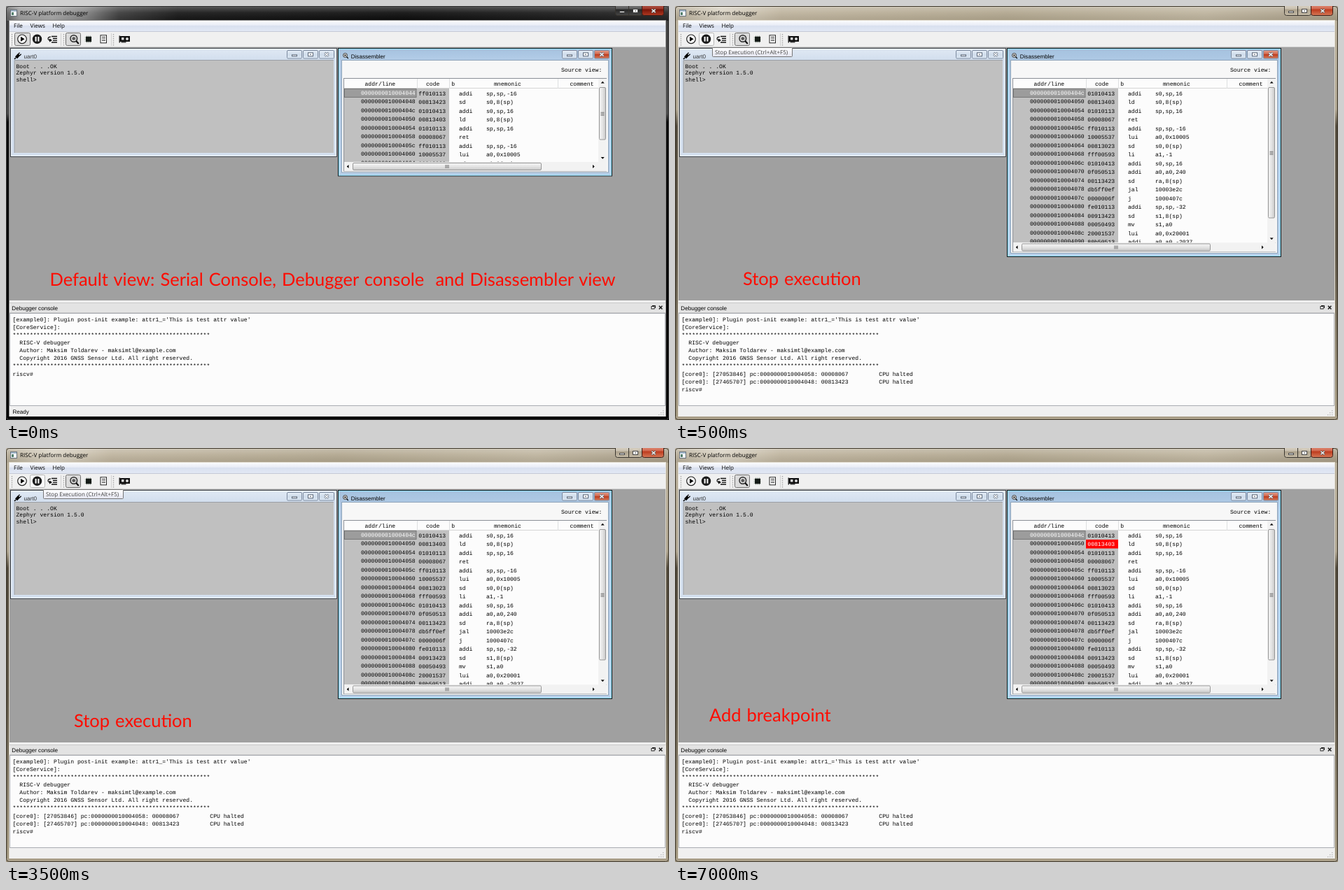
These frames come from a looping animation (947 by 592 pixels, 8 s). An HTML page:

```html
<!DOCTYPE html>
<html lang="en">
<head>
<meta charset="utf-8">
<title>Debugger walkthrough</title>
<style>
  html, body { margin: 0; width: 100%; height: 100%; overflow: hidden; background: #000; }
  svg { display: block; width: 947px; height: 592px; }
  text { white-space: pre; text-rendering: geometricPrecision; }
  .mono { font: 8.1px "Liberation Mono", monospace; }
  .ui { font: 8.1px "Open Sans", sans-serif; }
  .label { font: 8.1px "Liberation Sans", sans-serif; }
  .caption { font: 25.5px Lato, sans-serif; word-spacing: 1.5px; fill: #ff0c00; }
</style>
</head>
<body>
<svg id="stage" viewBox="0 0 947 592"></svg>
<script>
const LOOP = 8000;
const STARTS = [0, 500, 5500];

const rect = (x, y, w, h, fill, extra = '') =>
  `<rect x="${x}" y="${y}" width="${w}" height="${h}" fill="${fill}" ${extra}/>`;
const box = (x, y, w, h, fill, stroke, r = 0) =>
  rect(x, y, w, h, fill, `stroke="${stroke}" stroke-width="1" rx="${r}"`);
const line = (d, stroke = '#000', width = 1) =>
  `<path d="${d}" fill="none" stroke="${stroke}" stroke-width="${width}"/>`;
const shape = (d, fill = '#000') => `<path d="${d}" fill="${fill}"/>`;
const circle = (x, y, r, fill, stroke = 'none', width = 1) =>
  `<circle cx="${x}" cy="${y}" r="${r}" fill="${fill}" stroke="${stroke}" stroke-width="${width}"/>`;
const text = (cls, x, y, s, fill = '#000') =>
  `<text class="${cls}" x="${x}" y="${y}" fill="${fill}">${s}</text>`;
const mono = (x, y, s, fill) => text('mono', x, y, s, fill);
const lines = (x, y, pitch, list) => list.map((s, i) => mono(x, y + i * pitch, s)).join('');
const during = (states, body) => `<g data-states="${states}">${body}</g>`;
const gradient = (id, horizontal, stops) =>
  `<linearGradient id="${id}" x2="${+horizontal}" y2="${+!horizontal}">` +
  stops.map(([at, color]) => `<stop offset="${at}" stop-color="${color}"/>`).join('') +
  '</linearGradient>';

const defs = '<defs>' + [
  gradient('darkTitle', true, [[0, '#5c5c5c'], [.02, '#9a9a9a'], [.07, '#a4a4a4'], [.12, '#818181'], [.17, '#3a3a3a'], [.26, '#161616'], [.6, '#0c0c0c'], [1, '#242424']]),
  gradient('tanTitle', true, [[0, '#b5ab96'], [.07, '#d8d1c2'], [.16, '#bdb29c'], [.5, '#b0a58d'], [.8, '#bdb39d'], [1, '#a69b85']]),
  gradient('darkSide', false, [[0, '#3c3c3c'], [.26, '#4a4a4a'], [.28, '#0a0a0a'], [1, '#000']]),
  gradient('tanSide', false, [[0, '#b9af9a'], [.25, '#aaa08b'], [.29, '#51493b'], [.6, '#5b5344'], [1, '#a3987f']]),
  gradient('shine', false, [[0, 'rgba(255,255,255,.3)'], [.45, 'rgba(255,255,255,.08)'], [1, 'rgba(0,0,0,.06)']]),
  gradient('menu', false, [[0, '#fbfcfe'], [.45, '#e7ebf5'], [.5, '#d9e0ef'], [1, '#e2e8f4']]),
  gradient('idle', false, [[0, '#e0e9f4'], [.1, '#d3dfee'], [1, '#d5e1f0']]),
  gradient('active', false, [[0, '#a5c2df'], [.1, '#b4cde8'], [1, '#b9d2ec']]),
  gradient('button', false, [[0, '#e6eef7'], [.5, '#cfdceb'], [1, '#dce7f3']]),
  gradient('close', false, [[0, '#e5a18f'], [.45, '#d0654b'], [.5, '#bd3a1d'], [1, '#d67a58']]),
  gradient('darkClose', false, [[0, '#b5685c'], [.45, '#9e3527'], [.5, '#761408'], [1, '#b03a22']]),
  gradient('darkButton', false, [[0, '#8b8b8b'], [.45, '#5a5a5a'], [.5, '#272727'], [1, '#464646']]),
  gradient('tanButton', false, [[0, '#ded8cc'], [.45, '#c9c0af'], [.5, '#aca18c'], [1, '#c6bca8']]),
  gradient('thumbV', true, [[0, '#f6f6f6'], [.5, '#e4e4e4'], [1, '#c8c8c8']]),
  gradient('thumbH', false, [[0, '#f6f6f6'], [.5, '#e4e4e4'], [1, '#c8c8c8']]),
  gradient('tip', false, [[0, '#fff'], [1, '#e4e5f0']]),
].join('') + '</defs>';

// Glyphs for minimise, maximise and close, centred on three x positions.
const windowGlyphs = (xs, y, ink, crossInk) =>
  box(xs[0] - 3.5, y + .5, 7, 2, '#fff', ink) +
  box(xs[1] - 3.5, y - 2.5, 7, 5, '#fff', ink) + rect(xs[1] - 1, y - .5, 2, 1, ink) +
  line(`M${xs[2] - 2.7} ${y - 2.5}l5.4 5m0 -5l-5.4 5`, ink, 2.6) +
  line(`M${xs[2] - 2.5} ${y - 2.3}l5 4.6m0 -4.6l-5 4.6`, crossInk, 1.4);

const outerFrame = (tone, edge) =>
  rect(0, 0, 947, 592, `url(#${tone}Side)`) +
  rect(0, 0, 947, 21, `url(#${tone}Title)`) +
  rect(0, 0, 947, 21, 'url(#shine)') +
  rect(0, 587, 947, 5, tone === 'dark' ? '#050505' : '#a99e88') +
  box(.5, .5, 946, 591, 'none', edge, 4) +
  box(4.5, 20.5, 938, 566, 'none', tone === 'dark' ? '#8a8a8a' : '#e0dacd') +
  box(870.5, -3.5, 38, 17, `url(#${tone}Button)`, '#38342e', 3) +
  line('M889.5 0V13', '#38342e') +
  box(908.5, -3.5, 31, 17, `url(#${tone === 'dark' ? 'darkClose' : 'close'})`, '#3d1d17', 3) +
  windowGlyphs([880, 899, 925], 7, '#444', '#fff');

const header =
  box(6.5, 5.5, 9, 9, '#f4f6f8', '#69737d') + rect(7, 6, 8, 2, '#a7bccf') + rect(8, 9, 3, 4, '#53806d') +
  text('ui', 20, 13.3, 'RISC-V platform debugger') +
  rect(5, 21, 937, 566, '#f0f0f0') +
  rect(5, 21, 937, 15, 'url(#menu)') +
  line('M5 36.5H942', '#c4c9d6') +
  [[11, 'File'], [34.5, 'Views'], [66.5, 'Help']].map(([x, s]) => text('ui', x, 31.2, s)).join('') +
  line('M5 58.5H942', '#cfcfcf');

const pressed = (x, w, fill = '#dcdcdc', edge = '#6f6f6f') => box(x, 38.5, w, 18, fill, edge, 2);
const magnifier = (x, y, k) =>
  `<g transform="translate(${x} ${y}) scale(${k})">` +
  circle(0, 0, 4.8, '#e6e6e6', '#222', 1.4) +
  `<ellipse rx="1.8" ry="2.6" fill="#555"/>` +
  line('M-3 -2l6 4m0 -4l-6 4M-3 0h6', '#555', .7) +
  line('M3.4 3.6L7 7.4', '#111', 2.2) + '</g>';

const toolbar =
  [8.5, 82.5, 153.5].map(x => `<path d="M${x} 40V57" stroke="#a8a8a8" stroke-width="1.4" stroke-dasharray="1.4 1.6"/>`).join('') +
  line('M78.5 39V57M150.5 39V57', '#d2d2d2') +
  during('0', pressed(12.5, 22)) +
  during('1', pressed(34.5, 21, '#f8f8f8', '#b4b4b4')) +
  pressed(85.5, 21) +
  circle(23, 47.3, 6.3, '#fff', '#222', 1.2) + shape('M21 43.8L26.6 47.3L21 50.8Z') +
  circle(44.5, 47.3, 6.7, '#1b1b1b') + rect(41.6, 44, 2, 6.6, '#fff') + rect(45.4, 44, 2, 6.6, '#fff') +
  line('M65 43.5H73M67 46.5H73M67 49.3H73M65 52H73', '#111', 1.3) +
  line('M64 44.2C59 44 59 49 63 49', '#111', 1.2) + shape('M62 46.6L66 49.1L62 51.6Z') +
  magnifier(96.8, 46.5, 1) +
  line('M112 45h11M112 47.5h11M112 50h11M115.5 42v11M118 42v11M120.5 42v11', '#b9c2b9', 1) +
  rect(114, 43.7, 8, 7.6, '#151b17') +
  box(135, 41.8, 8.5, 11, '#fff', '#222') + line('M137 44.5h5M137 47h5M137 49.5h5', '#333', 1) +
  rect(161.5, 42.5, 1.5, 10, '#222') + rect(163, 43, 14, 8, '#111') +
  rect(165, 45, 3.5, 3.5, '#ddd') + circle(173, 47, 2, '#ddd') + rect(164.5, 51, 7, 1.5, '#444');

const subwindow = (x, y, w, h, skin, edge) =>
  box(x + .5, y + .5, w - 1, h - 1, `url(#${skin})`, edge) +
  box(x + 1.5, y + 1.5, w - 3, h - 3, 'none', skin === 'active' ? '#8fe0f6' : '#f3f8fd');

const subButtons = (x, closeFill, crossInk) =>
  [0, 23, 46].map((dx, i) =>
    box(x + dx + .5, 63.5, 21, 11.5, i === 2 ? closeFill : 'url(#button)', '#7d8ba0', 1.5)).join('') +
  windowGlyphs([x + 11, x + 34, x + 57], 69.3, '#5a6678', crossInk);

const uart =
  subwindow(6, 60, 467, 156, 'idle', '#3c4249') +
  line('M12 76l2 -2', '#000', 1.6) +
  shape('M13 72.5L17 68L20 71L16 75.2Z') + line('M17.5 69l2 -2.4M19.4 71l2.2 -2.2', '#000', 1.3) +
  text('label', 25.5, 74.6, 'uart0', '#333') +
  subButtons(401, 'url(#button)', '#fff') +
  rect(12, 78, 456, 132, '#c0c0c0') + line('M12 210V77.5H468', '#9a9fa6') +
  lines(14.5, 88.7, 9.65, ['Boot . . .OK', 'Zephyr version 1.5.0', 'shell&gt;']);

const PROGRAM = `ff010113 addi sp,sp,-16
00813423 sd s0,8(sp)
01010413 addi s0,sp,16
00813403 ld s0,8(sp)
01010113 addi sp,sp,16
00008067 ret
ff010113 addi sp,sp,-16
10005537 lui a0,0x10005
00813023 sd s0,0(sp)
fff00593 li a1,-1
01010413 addi s0,sp,16
0f050513 addi a0,a0,240
00113423 sd ra,8(sp)
db5ff0ef jal 10003e2c
0000006f j 1000407c
fe010113 addi sp,sp,-32
00913423 sd s1,8(sp)
00050493 mv s1,a0
20001537 lui a0,0x20001
80b50513 addi a0,a0,-2037`.split('\n').map((row, i) => ({
  address: (0x10004044 + 4 * i).toString(16).padStart(16, '0'),
  parts: row.split(' '),
}));

const codeRow = ({ address, parts: [code, op, args = ''] }, i) => {
  const y = 127.7 + 12.5 * i;
  return mono(507, y - 1, address, i ? '#000' : '#fff') +
    mono(589.3, y, code) + mono(647, y, op) + mono(686, y, args);
};

function scrollbars(bottom, thumbEnd) {
  const midV = (117 + thumbEnd) / 2, y = bottom + 6.5;
  return rect(846, 104, 12, bottom - 104, '#f2f2f2') +
    box(847.5, 116.5, 9, thumbEnd - 117, 'url(#thumbV)', '#979797', 1.5) +
    line(`M849.5 ${midV - 2}h5m-5 2h5m-5 2h5`, '#666', .9) +
    shape(`M849.7 110.5h5l-2.5 -2.7zM849.7 ${bottom - 7}h5l-2.5 2.7z`) +
    rect(483, bottom, 375, 13, '#f2f2f2') +
    box(495.5, bottom + 1.5, 269, 10, 'url(#thumbH)', '#979797', 1.5) +
    line(`M628 ${y - 2.5}v5m2 -5v5m2 -5v5`, '#666', .9) +
    shape(`M489.5 ${y - 2.5}v5l-2.7 -2.5zM838 ${y - 2.5}v5l2.7 -2.5z`);
}

function disassembler(first, rows, bottom, thumbEnd) {
  const clip = `rows${first}`;
  return `<clipPath id="${clip}">${rect(482, 104, 376, bottom - 104, '#000')}</clipPath>` +
    subwindow(474, 60, 392, bottom + 20.5 - 60, 'active', '#15191e') +
    magnifier(484.5, 70.5, .62) +
    text('label', 492.7, 74.7, 'Disassembler') +
    subButtons(794, 'url(#close)', '#fff') +
    box(479.5, 77.5, 381, bottom - 62.5, '#f7f7f7', '#8ea3b8') +
    mono(793, 94.2, 'Source view:') +
    box(482.5, 103.5, 375, bottom - 90.5, '#fcfcfc', '#8b8f96') +
    `<g clip-path="url(#${clip})">` +
    rect(483, 118, 150, bottom - 118, '#c0c0c0') +
    line('M483 117.5H846', '#d5d5d5') + line('M587.5 104V118M633.5 104V118M788.5 104V118', '#dedfe1') +
    [[512.5, 'addr/line'], [600, 'code'], [636.3, 'b'], [697, 'mnemonic'], [805.5, 'comment']]
      .map(([x, s]) => mono(x, 113.9, s)).join('') +
    box(483.5, 118.5, 102.5, 12, '#9c9c9c', '#777') +
    PROGRAM.slice(first, first + rows).map(codeRow).join('') + '</g>' +
    scrollbars(bottom, thumbEnd);
}

const breakpoint = rect(587, 131, 46, 12.6, '#f00') + mono(589.3, 140.2, PROGRAM[3].parts[0], '#fff');

const stars = '*'.repeat(58);
const haltLine = (tick, pc, code) => `[core0]: [${tick}] pc:${pc}: ${code}         CPU halted`;
const consoleLine = (row, list) => lines(9.6, 450.8 + 11.1 * row, 11.1, list);

const consoleDock =
  rect(5, 421, 937, 166, '#f0f0f0') +
  rect(6, 425, 935, 13, '#e3e3e3') + line('M5 424.5H942M5 438.5H942', '#cacaca') +
  text('label', 8.3, 434.7, 'Debugger console') +
  box(922, 429.5, 4, 3.5, '#fff', '#222') + line('M923 428.5h4.5v3.5', '#222', 1) +
  line('M932.8 428.8l4.6 4.6m0 -4.6l-4.6 4.6', '#111', 1.4) +
  box(5.5, 439.5, 936, 132, '#fcfcfc', '#a9acb2') +
  consoleLine(0, [
    "[example0]: Plugin post-init example: attr1_='This is test attr value'",
    '[CoreService]:',
    stars,
    '  RISC-V debugger',
    '  Author: Maksim Toldarev - maksimtl@example.com',
    '  Copyright 2016 GNSS Sensor Ltd. All right reserved.',
    stars,
  ]) +
  during('0', consoleLine(7, ['riscv#']) + text('label', 9.5, 582.8, 'Ready')) +
  during('12', consoleLine(7, [
    haltLine(27053846, PROGRAM[5].address, PROGRAM[5].parts[0]),
    haltLine(27465707, PROGRAM[1].address, PROGRAM[1].parts[0]),
    'riscv#',
  ])) +
  [[938, 578], [935, 581], [938, 581], [932, 584], [935, 584], [938, 584]]
    .map(([x, y]) => rect(x, y, 1.3, 1.3, '#b5b5b5')).join('');

const tooltip = box(53.5, 59.5, 114, 13, 'url(#tip)', '#767676', 1) +
  text('ui', 57, 69.2, 'Stop Execution (Ctrl+Alt+F5)', '#444');

const stage = document.getElementById('stage');
stage.innerHTML = defs +
  during('0', outerFrame('dark', '#3a3a3a')) +
  during('12', outerFrame('tan', '#3f392e')) +
  header + toolbar +
  rect(5, 59, 937, 362, '#a0a0a0') +
  uart +
  during('0', disassembler(0, 9, 223, 191.5)) +
  during('12', disassembler(2, 18, 338.5, 303.5)) +
  during('2', breakpoint) +
  consoleDock +
  during('1', tooltip) +
  during('0', '<text class="caption" x="62.5" y="399.8">Default view: Serial Console, Debugger console  and Disassembler view</text>') +
  during('1', '<text class="caption" x="97" y="399.3">Stop execution</text>') +
  during('2', '<text class="caption" x="49" y="391">Add breakpoint</text>');

for (const group of stage.querySelectorAll('[data-states]')) {
  const opacityIn = state => group.dataset.states.includes(state) ? 1 : 0;
  const steps = STARTS.map((start, i) => ({ offset: start / LOOP, opacity: opacityIn(i), easing: 'step-end' }));
  steps.push({ offset: 1, opacity: opacityIn(STARTS.length - 1) });
  group.animate(steps, { duration: LOOP, iterations: Infinity }).startTime = 0;
}
const now = performance.now();
document.getAnimations().forEach(animation => { animation.startTime = now; });
</script>
</body>
</html>
```
